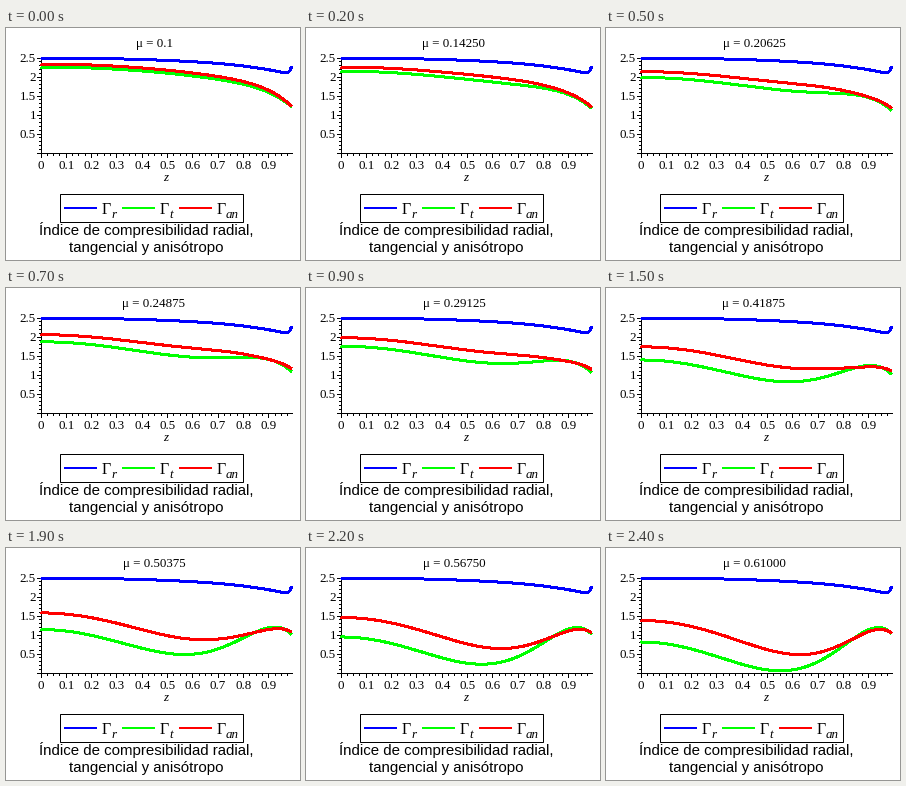
These frames come from a looping animation (294x232 px, 2.5 s). A matplotlib script:

```python
import numpy as np
import matplotlib.pyplot as plt
from matplotlib.animation import FuncAnimation
from matplotlib.patches import Rectangle

W, H, DPI = 294, 232, 64
PT = 72 / DPI                 # points per pixel
FRAMES, STEP = 25, 100
X0, Y0, SX, SY = 35, 125, 253, 38
SERIF, SANS = "Liberation Serif", "Liberation Sans"
BLUE, GREEN, RED = "#0000ff", "#00ff00", "#ff0000"

z = np.linspace(0, 0.99, 300)
u = z * z


def radial():
    return 2.5 - 0.242 * u - 0.213 * u**3 + 0.213 * np.exp((z - 0.99) / 0.008)


def tangential(t):
    start = 2.263 - 0.65 * u - 0.45 * z**11
    drop = 1.447 + 4.3 * u - 7.425 * u**2 - 4.03 * u**3 + 5.9 * u**4
    bend = 0.04 - 0.14 * z**3
    return start - t * drop + 4 * t * (1 - t) * bend


def anisotropic(t):
    start = 2.342 - 0.65 * u - 0.53 * z**11
    drop = 0.96 + 3.4 * u - 2.2 * u**2 - 8.4 * u**3 + 6.4 * u**4
    bend = 0.09 * np.sin(2 * np.pi * z**3)
    return start - t * drop + 4 * t * (1 - t) * bend


fig = plt.figure(figsize=(W / DPI, H / DPI), dpi=DPI, facecolor="white")
ax = fig.add_axes([0, 0, 1, 1])
ax.set(xlim=(0, W), ylim=(H, 0))
ax.axis("off")


def text(x, y, s, size=13, font=SERIF, ha="left", style="normal"):
    return ax.text(x, y, s, fontsize=size * PT, family=font, ha=ha,
                   va="baseline", style=style, color="black")


def stroke(xs, ys, color="black", width=1, **kw):
    return ax.plot(xs, ys, color=color, lw=width * PT, snap=False, antialiased=False,
                   solid_capstyle="butt", solid_joinstyle="round", **kw)[0]


def curve(values, color, zorder):
    return stroke(X0 + SX * z, Y0 - SY * values, color, 2, zorder=zorder)


def draw_axes():
    stroke([X0 + 0.5] * 2, [29, 126])
    stroke([35, 287], [Y0 + 0.5] * 2)
    for i in range(40):
        x = np.floor(X0 + SX * i / 40) + 0.5
        stroke([x, x], [126, 128 if i % 4 else 130])
    for i in range(26):
        y = np.floor(Y0 - SY * i / 10) + 0.5
        stroke([33 if i % 5 else 31, 35], [y, y])
    for i in range(10):
        text(X0 + SX * i / 10, 141, f"{i / 10:g}", ha="center")
    for v in (0.5, 1, 1.5, 2, 2.5):
        text(30, Y0 - SY * v + 4, f"{v:g}", ha="right")
    text(159.5, 153, "z", ha="center", style="italic")


def draw_legend():
    ax.add_patch(Rectangle((54.5, 166.5), 183, 28, fill=False, ec="black",
                           lw=PT, snap=False))
    for x, color, sub in ((58, BLUE, "r"), (116, GREEN, "t"), (173, RED, "an")):
        stroke([x, x + 33], [180, 180], color, 2)
        text(x + 38, 186, "Γ", 16)
        text(x + 47, 190, sub, 13, style="italic")


draw_axes()
draw_legend()
text(140.5, 207, "Índice de compresibilidad radial,", 15, SANS, "center")
text(140, 224, "tangencial y anisótropo", 15, SANS, "center")

curve(radial(), BLUE, 3)
green = curve(tangential(0), GREEN, 4)
red = curve(anisotropic(0), RED, 5)
title = text(148, 19, "", ha="center")


def update(i):
    t = i / (FRAMES - 1)
    mu = f"{0.1 + 0.51 * t:.5f}" if i else "0.1"
    title.set_text(f"μ = {mu}")
    green.set_ydata(Y0 - SY * tangential(t))
    red.set_ydata(Y0 - SY * anisotropic(t))
    return green, red, title


anim = FuncAnimation(fig, update, frames=FRAMES, interval=STEP,
                     init_func=lambda: update(0), repeat=True, repeat_delay=0)
plt.show()
```
